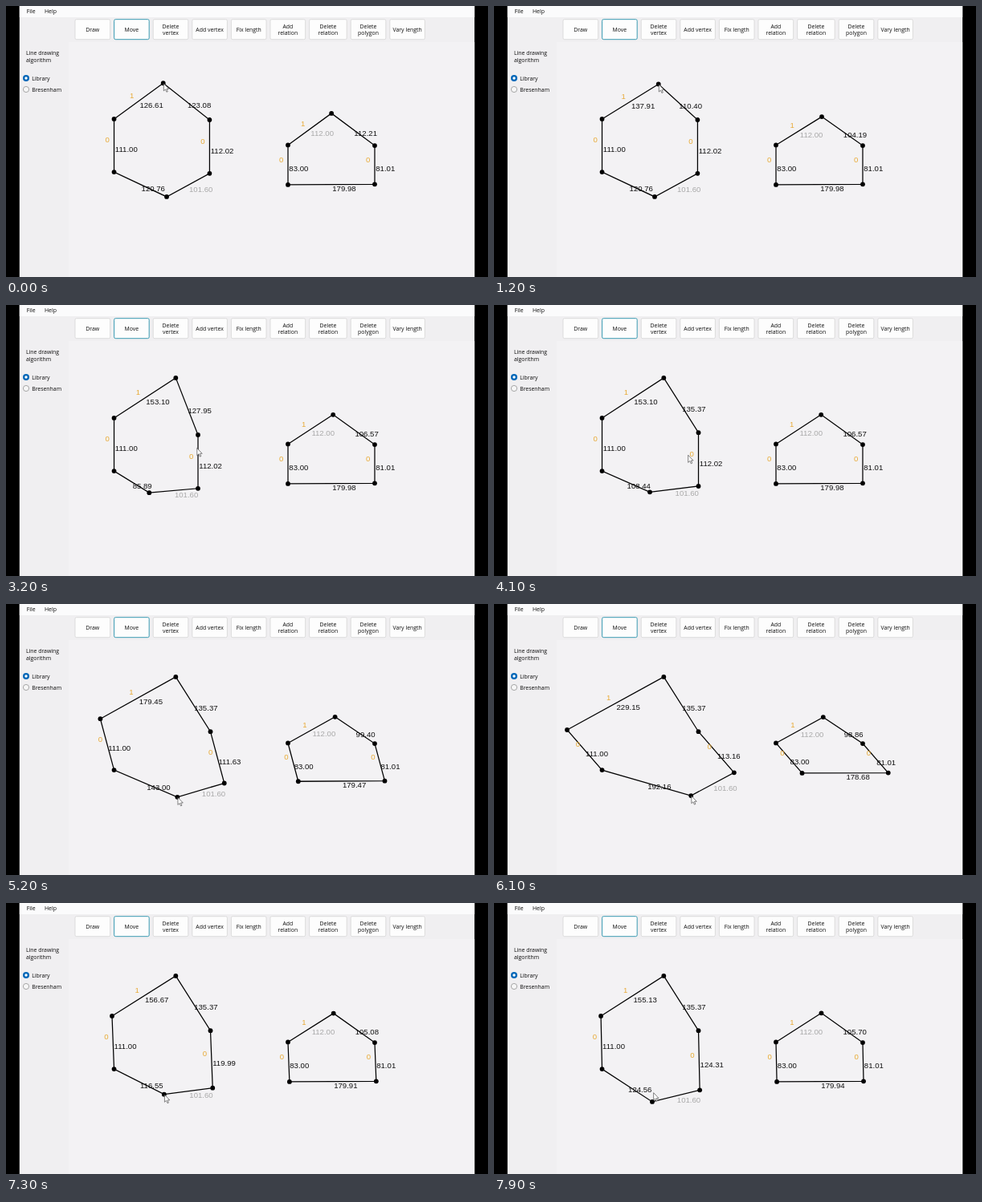
Write an HTML page that moves like this. It is 600 px wide and 338 px high and loops after 8000 ms.

```html
<!DOCTYPE html>
<html lang="en">
<head>
<meta charset="utf-8">
<title>Polygon editor</title>
<style>
html, body { margin: 0; width: 100%; height: 100%; overflow: hidden; background: #000; }
svg { display: block; width: 100vw; height: 100vh; }
.ui { font: 6.9px "Open Sans", "Noto Sans", sans-serif; fill: #0c0c0c; }
.num { font: 9.6px "Liberation Sans", Arial, sans-serif; }
.mid { text-anchor: middle; }
</style>
</head>
<body>
<svg viewBox="0 0 600 338">
  <rect width="600" height="338"/>
  <rect x="16.8" width="566.4" height="338" fill="#f0eff1"/>
  <rect x="16.8" width="566.4" height="14" fill="#fbfbfc"/>
  <rect x="78" y="45" width="505.2" height="293" fill="#f3f2f4"/>
  <g class="ui">
    <text x="25.7" y="9.4">File</text>
    <text x="48" y="9.4">Help</text>
    <text x="25" y="61.3">Line drawing</text>
    <text x="25" y="70.1">algorithm</text>
    <circle cx="25" cy="90" r="4" fill="#0067b8"/>
    <circle cx="25" cy="90" r="1.7" fill="#fff"/>
    <text x="32.2" y="92.6">Library</text>
    <circle cx="25" cy="104" r="3.6" fill="#f6f6f6" stroke="#868686" stroke-width=".7"/>
    <text x="32.2" y="106.6">Bresenham</text>
    <g id="bar" class="mid"></g>
  </g>
  <g id="scene" class="num"></g>
  <path id="cursor" d="M0 0V9.2L2.1 7.3L3.6 10.6L5 10L3.6 6.8H6.4Z" fill="#fff" stroke="#333" stroke-width=".6"/>
</svg>
<script>
const $ = id => document.getElementById(id);
const LOOP = 8000, STEP = 100;
const BLACK = '#111', GREY = '#a9a9a9', ORANGE = '#e8aa35';

const buttons = ['Draw', 'Move', 'Delete|vertex', 'Add vertex', 'Fix length',
  'Add|relation', 'Delete|relation', 'Delete|polygon', 'Vary length'];
let edge = 86;
$('bar').innerHTML = buttons.map((name, i) => {
  const lines = name.split('|'), width = name == 'Delete|relation' ? 46.6 : 43.6;
  const x = edge, active = name == 'Move';
  edge += width + 5;
  return `<rect x="${x}" y="16.7" width="${width}" height="25" rx="1.8" fill="#fdfdfd"
    stroke="${active ? '#3a9bb2' : '#d2d2d2'}" stroke-width="${active ? 1 : .7}"/>` +
    lines.map((s, k) => `<text x="${x + width / 2}"
      y="${31.8 + (k - (lines.length - 1) / 2) * 8.4}">${s}</text>`).join('');
}).join('');

// Vertices and lengths are in editor units
const top3 = [[0, 326.2, 159.49], [1200, 341.19, 161.48], [2000, 352.19, 150.49]];
const shoulder = [[2400, 422.39, 236.28], [3200, 398.34, 269.83], [3900, 424.19, 265.12]];
// time, tilt of the parallel sides, right side length, angle of the fixed bottom edge
const swing = [
  [2400, 0, 112.02, 28.77], [3200, 0, 112.02, 5.08], [4600, 0, 112.02, 8],
  [5200, 14.9, 111.63, 16.62], [5700, 53, 114, 39], [6100, 40.78, 113.16, 28.4],
  [6800, -17.4, 129.97, -15.92], [7500, 10, 116, 17], [7900, 1.24, 124.31, 13.97]];

const mix = (a, b, k) => a.map((v, i) => v + (b[i] - v) * k);
const add = (p, d, n) => [p[0] + d[0] * n, p[1] + d[1] * n];
const dist = (p, q) => Math.hypot(p[0] - q[0], p[1] - q[1]);
const heading = deg => [Math.sin(deg * Math.PI / 180), Math.cos(deg * Math.PI / 180)];
const screen = p => [p[0] * .6, p[1] * .596 + 1.2];

function ease(t, from, span) {
  const k = Math.min(1, Math.max(0, (t - from) / span));
  return k * k * (3 - 2 * k);
}

function at(track, t) {
  const i = track.findIndex(row => row[0] > t);
  if (i == 0) return track[0].slice(1);
  if (i < 0) return track[track.length - 1].slice(1);
  const a = track[i - 1], b = track[i];
  return mix(a, b, (t - a[0]) / (b[0] - a[0])).slice(1);
}

const label = (x, y, color, s) =>
  `<text x="${x.toFixed(2)}" y="${y.toFixed(2)}" fill="${color}">${s}</text>`;

// relations and fixed lengths are keyed by the index of the edge's first point
function polygon(points, relations, fixed, locked) {
  const px = points.map(screen);
  let out = `<polygon points="${px.join(' ')}" fill="none" stroke="#000" stroke-width="1.25"/>`;
  px.forEach((p, i) => {
    const j = (i + 1) % px.length;
    const [x, y] = mix(p, px[j], .5);
    const len = fixed[i] || dist(points[i], points[j]);
    out += `<circle cx="${p[0]}" cy="${p[1]}" r="2.9"/>` +
      label(x + 1.3, y + 8.3, i == locked ? GREY : BLACK, len.toFixed(2));
    if (i in relations) out += label(x - 11.1, y - 3.6, ORANGE, relations[i]);
  });
  return out;
}

function draw(t) {
  const [tilt, side, bend] = at(swing, t), down = heading(tilt);
  const base = [224.2, 345.5], left = add(base, down, -111);
  const top = at(top3, t), right = at(shoulder, t), low = add(right, down, side);
  const tip = add(low, heading(bend - 90), 101.6);

  // The house keeps its sides parallel to those of the hexagon
  const n = dist(left, top), slope = [(top[0] - left[0]) / n, (top[1] - left[1]) / n];
  const west = [585, 289], east = [764.98, 290];
  const house = [west, add(west, slope, 112), east, add(east, down, 81.01), add(west, down, 83)];

  $('scene').innerHTML =
    polygon([left, top, right, low, tip, base], { 0: 1, 2: 0, 5: 0 }, { 3: 101.6, 5: 111 }, 3) +
    polygon(house, { 0: 1, 2: 0, 4: 0 }, { 0: 112, 2: 81.01, 4: 83 }, 0);

  // The pointer drags the top, then the right side, then the bottom tip, and heads back
  let hand = mix(top, add(right, [-3, 27], 1), ease(t, 2000, 400));
  hand = mix(hand, tip, ease(t, 3900, 700));
  hand = mix(hand, top, ease(t, 7700, 1200));
  const [x, y] = screen(hand);
  $('cursor').setAttribute('transform', `translate(${x + .6} ${y + .4})`);
}

const start = performance.now();
function tick() {
  const t = (performance.now() - start) % LOOP;
  draw(Math.floor(t / STEP) * STEP);
  requestAnimationFrame(tick);
}
tick();
</script>
</body>
</html>
```
